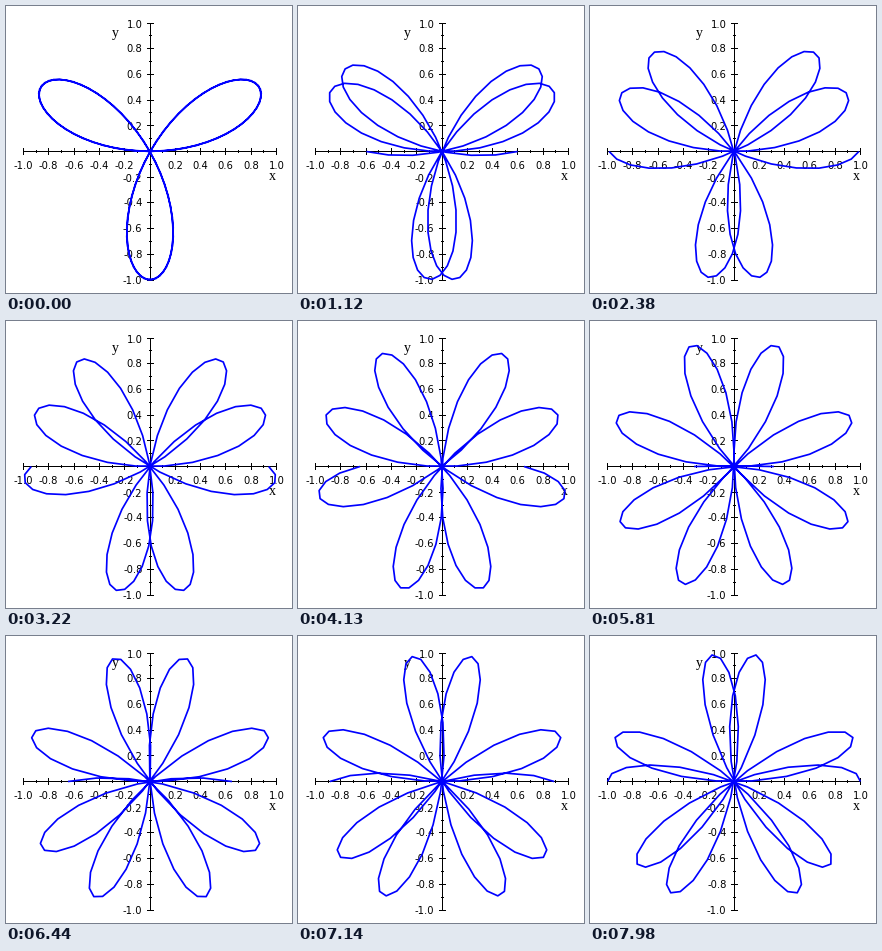
A matplotlib script for the animation above (8000 ms loop, 286 px wide and 287 px high).

```python
import numpy as np
import matplotlib.pyplot as plt
from matplotlib.animation import FuncAnimation
from matplotlib.collections import LineCollection

W, H, DPI = 286, 287, 100
PX = 72 / DPI                      # one pixel in points
CX, CY = 144.0, 145.5              # origin of the plot
SX, SY = 126.5, 128.5              # pixels per unit
LOOP, INTERVAL = 8000, 20
CLOCK = 70                         # ms; 16 curve steps take 49 clock ticks
K_START, K_STEP = 3, 2 / 49        # k runs from 3 to 5 in 50 stages

fig = plt.figure(figsize=(W / DPI, H / DPI), dpi=DPI, facecolor="white")
ax = fig.add_axes([0, 0, 1, 1])
ax.set_xlim(0, W)
ax.set_ylim(H, 0)
ax.axis("off")


def to_px(x, y):
    return CX + SX * x, CY - SY * y


def pixel(v):
    return np.floor(v) + 0.5


def label(x, y, text, size=10, font="DejaVu Sans", ha="center"):
    ax.text(x, y, text, fontsize=size * PX, family=font, ha=ha,
            va="baseline", color="black")


def draw_axes():
    ox, oy = pixel(CX), pixel(CY)
    segments = [[(17, oy), (271, oy)], [(ox, 17), (ox, 275)]]
    for i in range(-10, 11):
        if i == 0:
            continue
        major = i % 2 == 0
        half = 3.5 if major else 1.5
        tx, ty = map(pixel, to_px(i / 10, i / 10))
        segments.append([(tx, oy - half), (tx, oy + half)])
        segments.append([(ox - half, ty), (ox + half, ty)])
        if major:
            text = f"{i / 10:.1f}"
            label(tx, 163, text)
            label(136.5, ty + 4, text, ha="right")
    # Snapping is off because the lines already sit on pixel centres.
    ax.add_collection(LineCollection(segments, colors="black", linewidths=PX,
                                     capstyle="butt", snap=False))
    label(266.5, 174, "x", 14, "Liberation Serif")
    label(109.5, 31, "y", 14, "Liberation Serif")


draw_axes()
theta = np.linspace(-np.pi, np.pi, 100)
rose, = ax.plot([], [], color="#0000ff", lw=1.7 * PX, solid_joinstyle="round",
                solid_capstyle="butt", snap=False, zorder=5)


def update(frame):
    ticks = (frame * INTERVAL + INTERVAL // 2) // CLOCK
    k = K_START + K_STEP * (16 * ticks // 49)
    r = np.sin(k * theta)
    rose.set_data(*to_px(r * np.cos(theta), r * np.sin(theta)))
    return rose,


anim = FuncAnimation(fig, update, frames=LOOP // INTERVAL, interval=INTERVAL,
                     repeat=True, repeat_delay=0)
plt.show()
```
